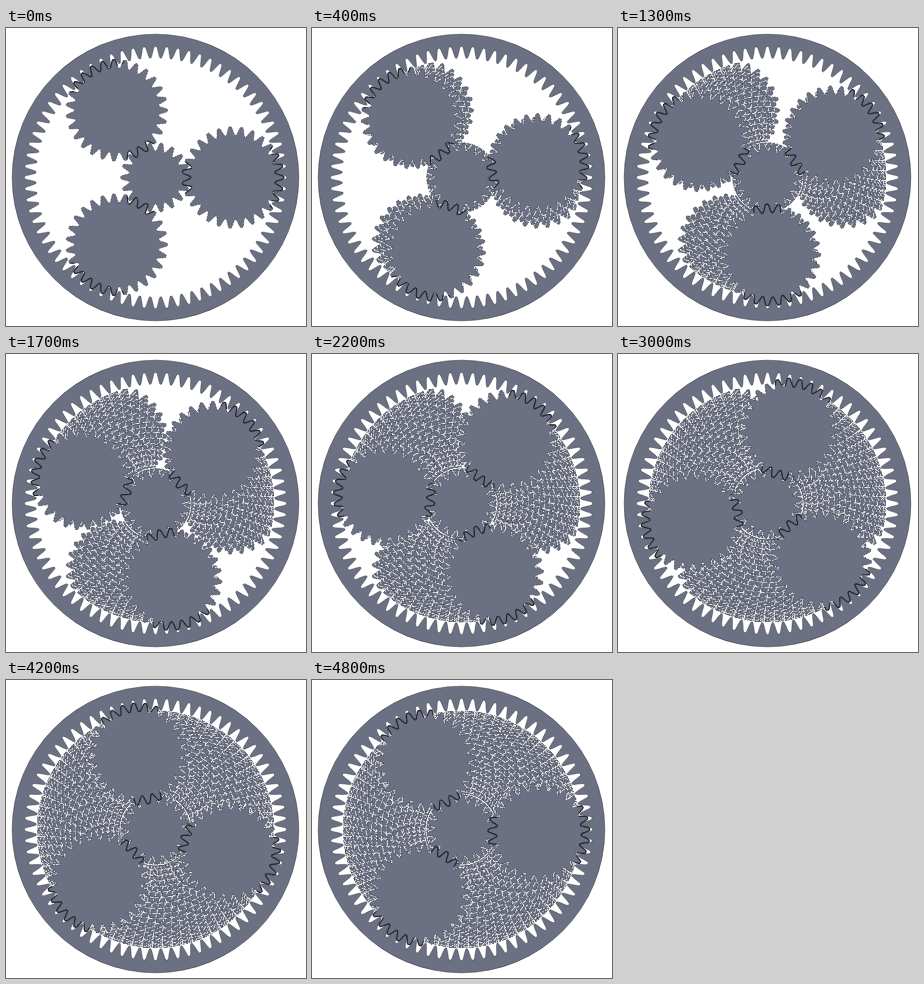
Write an HTML page with a canvas that moves like this. It is 300 px wide and 298 px high and loops after 4900 ms.

```html
<!DOCTYPE html>
<html lang="en">
<head>
<meta charset="utf-8">
<title>Planetary gears</title>
<style>
html, body { margin: 0; width: 100%; height: 100%; overflow: hidden; background: #fff; }
canvas { display: block; width: 300px; height: 298px; }
</style>
</head>
<body>
<canvas id="stage" width="300" height="298"></canvas>
<script>
const STEPS = 49, STEP_MS = 100;
const CX = 149.5, CY = 149.5, ORBIT = 77.5;
const FILL = '#6b7083', EDGE = '#25272e', SOFT_EDGE = 'rgba(37,39,46,.7)';
const TAU = Math.PI * 2, RAD = Math.PI / 180;

const view = document.getElementById('stage').getContext('2d');
const layer = document.createElement('canvas');
layer.width = 300;
layer.height = 298;
const trail = layer.getContext('2d');

// Tooth outline: [offset in pitches, height between root and tip]
const PROFILE = [[-.43, 0], [-.34, .2], [-.25, .5], [-.17, .8], [-.09, 1],
                 [.09, 1], [.17, .8], [.25, .5], [.34, .2], [.43, 0]];

function gearPath(teeth, root, tip) {
  const path = new Path2D();
  for (let i = 0; i < teeth; i++) {
    for (const [offset, height] of PROFILE) {
      const a = (i + offset) * TAU / teeth;
      const r = root + (tip - root) * height;
      path.lineTo(r * Math.cos(a), r * Math.sin(a));
    }
  }
  path.closePath();
  return path;
}

function circlePath(...radii) {
  const path = new Path2D();
  for (const r of radii) {
    path.moveTo(r, 0);
    path.arc(0, 0, r, 0, TAU);
  }
  return path;
}

const sun = gearPath(18, 26.5, 34.8);
const planet = gearPath(27, 42.3, 50.8);
const hollow = gearPath(72, 119.5, 131);
const rim = circlePath(143.3);

const ring = new Path2D(rim);
ring.addPath(hollow);
const gaps = new Path2D(hollow);
gaps.addPath(circlePath(119));
const teethBand = circlePath(133, 119);
const between = circlePath(37, 119);

function scoped(c, draw) {
  c.save();
  draw();
  c.restore();
}

function stroke(c, path, color, width, dash = [], shift = 0) {
  c.strokeStyle = color;
  c.lineWidth = width;
  c.setLineDash(dash);
  c.lineDashOffset = shift;
  c.stroke(path);
}

function flecks(path, n) {
  stroke(trail, path, '#fff', 2, [3, 1.5, 1, 2, 5, 2.5, 2, 1], n * 3.7);
}

function body(path) {
  trail.fillStyle = FILL;
  trail.fill(path);
  stroke(trail, path, SOFT_EDGE, .7, [2, 1]);
}

function place(c, angle, spin) {
  c.translate(ORBIT * Math.cos(angle), -ORBIT * Math.sin(angle));
  c.rotate(-spin);
}

const carrier = n => n * 120 / STEPS * RAD;

function eachPlanet(n, draw) {
  const a = carrier(n);
  for (let k = 0; k < 3; k++) draw(a + k * TAU / 3, -a * 5 / 3);
}

function resetTrail() {
  trail.clearRect(0, 0, 300, 298);
  scoped(trail, () => {
    trail.translate(CX, CY);
    trail.fillStyle = FILL;
    trail.fill(ring, 'evenodd');
    stroke(trail, rim, SOFT_EDGE, .7);
  });
}

// The ring's teeth come clean again wherever no planet meshes.
function refreshRing() {
  scoped(trail, () => {
    trail.clip(teethBand, 'evenodd');
    trail.fillStyle = FILL;
    trail.fill(ring, 'evenodd');
    trail.fillStyle = '#fff';
    trail.fill(gaps, 'evenodd');
    stroke(trail, hollow, SOFT_EDGE, .6);
  });
}

// Gears are laid over earlier poses, so their edges build up.
function addPose(n) {
  scoped(trail, () => {
    trail.translate(CX, CY);
    trail.lineJoin = 'round';
    refreshRing();
    scoped(trail, () => {
      trail.rotate(-5 * carrier(n));
      flecks(sun, n);
      body(sun);
    });
    eachPlanet(n, (angle, spin) => {
      scoped(trail, () => {
        trail.clip(between, 'evenodd');
        place(trail, angle, spin);
        flecks(planet, n);
      });
      scoped(trail, () => {
        place(trail, angle, spin);
        body(planet);
      });
    });
  });
}

function meshLine(angle, spin, inner, outer, spread) {
  scoped(view, () => {
    view.beginPath();
    view.arc(0, 0, outer, -angle - spread, -angle + spread);
    view.arc(0, 0, inner, -angle + spread, -angle - spread, true);
    view.clip();
    place(view, angle, spin);
    stroke(view, planet, EDGE, 1.2);
  });
}

function show(n) {
  view.fillStyle = '#fff';
  view.fillRect(0, 0, 300, 298);
  view.drawImage(layer, 0, 0);
  scoped(view, () => {
    view.translate(CX, CY);
    view.lineJoin = 'round';
    eachPlanet(n, (angle, spin) => {
      meshLine(angle, spin, 118, 132, 15 * RAD);
      meshLine(angle, spin, 25, 38, 28 * RAD);
    });
  });
}

let last = STEPS;
function render(now) {
  const n = Math.floor(Math.max(0, now - start) / STEP_MS) % STEPS;
  if (n !== last) {
    if (n < last) {
      resetTrail();
      last = -1;
    }
    while (last < n) addPose(++last);
    show(n);
  }
  requestAnimationFrame(render);
}

const start = performance.now();
render(start);
</script>
</body>
</html>
```
